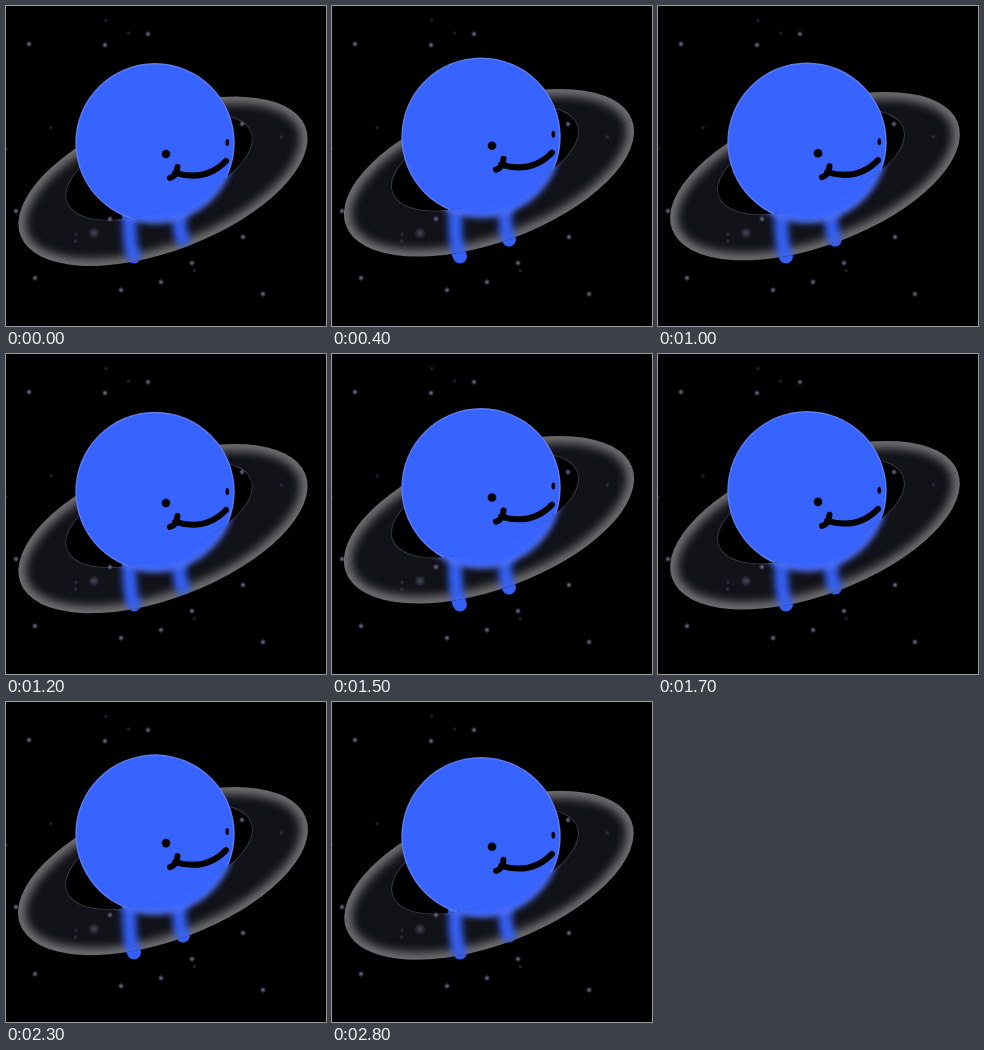
Recreate the animation shown at these times as an HTML page with a canvas. Size 320 px wide and 320 px high, loop 2900 ms.

```html
<!DOCTYPE html>
<html lang="en">
<head>
<meta charset="utf-8">
<title>Ringed planet</title>
<style>
html, body { margin: 0; height: 100%; overflow: hidden; background: #000; }
canvas { display: block; }
</style>
</head>
<body>
<canvas id="stage" width="320" height="320"></canvas>
<script>
const ctx = document.getElementById('stage').getContext('2d');
const LOOP = 2900, STEP = 100, TAU = Math.PI * 2;
const BOBS_PER_SECOND = 4.244;

const brightStars = [[23, 38], [99, 39], [142, 28], [10, 205], [104, 213],
  [115, 284], [29, 272], [186, 257], [155, 276], [237, 231], [257, 288], [236, 118]];

const legs = new Path2D('M123.5 195Q122 238 128 250.5M173 195Q172 224 177 233.5');
const mouth = new Path2D('M164 173Q171 171 171.5 162M169 168Q200 177 220 156');

function oval(x, y, rx, ry, color) {
  ctx.fillStyle = color;
  ctx.beginPath();
  ctx.ellipse(x, y, rx, ry, 0, 0, TAU);
  ctx.fill();
}

function line(path, width, color) {
  ctx.lineWidth = width;
  ctx.strokeStyle = color;
  ctx.stroke(path);
}

function drawStar(x, y, radius, light) {
  const glow = ctx.createRadialGradient(x, y, 0, x, y, radius);
  glow.addColorStop(0, `rgba(170,165,215,${light})`);
  glow.addColorStop(1, 'rgba(170,165,215,0)');
  oval(x, y, radius, radius, glow);
}

function drawSky() {
  ctx.fillStyle = '#000';
  ctx.fillRect(0, 0, 320, 320);
  let seed = 11;
  const random = () => (seed = seed * 16807 % 2147483647) / 2147483647;
  for (let i = 0; i < 12; i++) drawStar(random() * 320, random() * 320, 2.5, .25);
  brightStars.forEach(([x, y]) => drawStar(x, y, 3.2, .7));
  drawStar(88, 227, 6, .4);
}

function drawPlanet(lift) {
  ctx.lineCap = ctx.lineJoin = 'round';
  line(legs, 14, '#3560f5');
  oval(149, 137.5 + lift, 79.7, 79.7, '#5f7bf0');
  oval(149, 137.5 + lift, 78.3, 78.3, '#3763ff');
  ctx.save();
  ctx.translate(0, lift * 1.45);
  oval(160, 149, 4.3, 4.3, '#000');
  oval(221.3, 137.5, 1.8, 3.5, '#000');
  line(mouth, 6, '#000');
  ctx.restore();
}

function makeRing(y) {
  const tilt = -(20 + (y - 164) * .08) * Math.PI / 180;
  const outer = new Path2D(), hole = new Path2D(), band = new Path2D(), front = new Path2D();
  outer.ellipse(157, y, 152.5, 69.5, tilt, 0, TAU);
  hole.ellipse(153, y - 14, 98, 42, tilt, 0, TAU);
  band.addPath(outer);
  band.addPath(hole);
  front.ellipse(157, y, 165, 80, tilt, 0, Math.PI);
  return { outer, hole, band, front };
}

function drawRing(ring) {
  ctx.save();
  ctx.clip(ring.band, 'evenodd');
  ctx.fillStyle = 'rgba(90,90,125,.2)';
  ctx.fillRect(0, 0, 320, 320);
  ctx.filter = 'blur(5px)';
  line(ring.outer, 14, 'rgba(150,150,150,.75)');
  ctx.filter = 'none';
  line(ring.hole, 1.5, 'rgba(150,150,155,.3)');
  ctx.restore();
}

function draw(t) {
  const bob = lag => Math.cos(TAU * (BOBS_PER_SECOND * t / 1000 - lag));
  const lift = 3.5 * (bob(.105) - 1);
  const ring = makeRing(169.3 + 6 * bob(.017));
  drawSky();
  drawRing(ring);
  drawPlanet(lift);

  // Frosted front half of the ring
  ctx.save();
  ctx.clip(ring.front);
  ctx.clip(ring.band, 'evenodd');
  drawSky();
  drawRing(ring);
  ctx.filter = 'blur(3.5px)';
  drawPlanet(lift);
  ctx.restore();
}

function tick() {
  const t = performance.now() % LOOP;
  draw(Math.floor(t / STEP) * STEP);
  requestAnimationFrame(tick);
}
tick();
</script>
</body>
</html>
```
